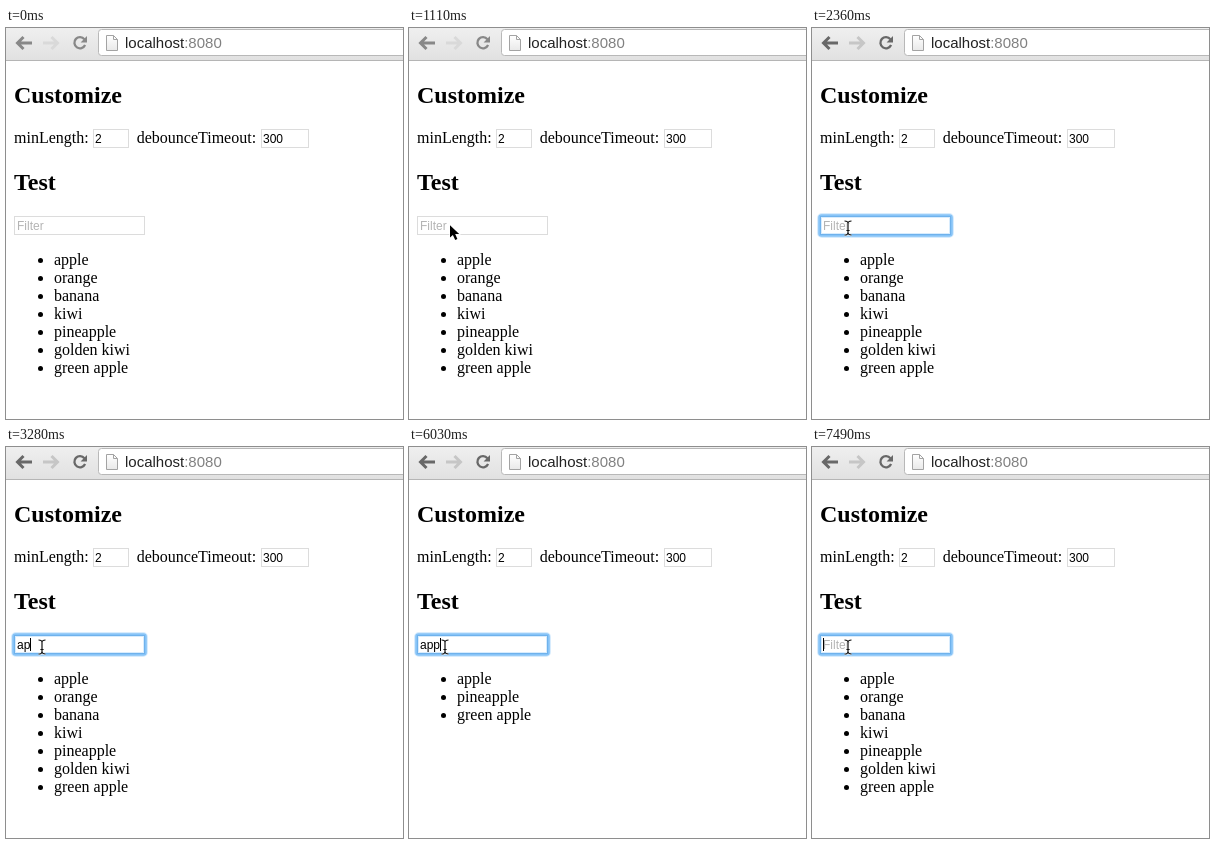
These frames come from a looping animation (397 by 391 pixels, 8 s). An HTML page:

```html
<!DOCTYPE html>
<html lang="en">
<head>
<meta charset="utf-8">
<title>Debounced filter</title>
<style>
  html, body { margin: 0; width: 100%; height: 100%; overflow: hidden; background: #fff; }
  svg { display: block; width: 397px; height: 391px; }
  text { font: 16px "Liberation Serif", "Times New Roman", serif; fill: #000; white-space: pre; }
  .title { font-size: 24px; font-weight: bold; }
  .field { font: 12px "Liberation Sans", Arial, sans-serif; }
  .hint { fill: #b4b4b4; }
  .url { font: 15px "Liberation Sans", Arial, sans-serif; fill: #222; }
  .port { fill: #808080; }
  .box { fill: #fff; stroke: #dcdcdc; }
  .icon { fill: none; stroke: #888; stroke-width: 3; }
  .forward { stroke: #d9d9d9; }
  .head { fill: #888; }
  .active .icon { stroke: #686868; }
  .active .forward { stroke: #c6c6c6; }
  .active .head { fill: #686868; }
</style>
</head>
<body>
<svg viewBox="0 0 397 391">
  <defs>
    <linearGradient id="bar" x2="0" y2="1">
      <stop offset="0" stop-color="#efefef"/><stop offset="1" stop-color="#e1e1e1"/>
    </linearGradient>
    <linearGradient id="paper" x2="0" y2="1">
      <stop offset="0" stop-color="#fff"/><stop offset="1" stop-color="#e9e9e9"/>
    </linearGradient>
  </defs>

  <g id="toolbar">
    <rect width="397" height="32" fill="url(#bar)"/>
    <rect y="32" width="397" height="1" fill="#b5b5b5"/>
    <rect x="92.5" y="1.5" width="320" height="26" rx="3" fill="#fff" stroke="#b8b8b8"/>
    <path class="icon" d="M17.5 9 11.5 15l6 6M11.5 15H26"/>
    <path class="icon forward" d="M45.5 9l6 6-6 6M51.5 15H37"/>
    <path class="icon" style="stroke-width:2.3" d="M78.4 11.2A5.6 5.6 0 1 0 79.1 17"/>
    <path class="head" d="M81 8v6.4h-6.4z"/>
    <path d="M100.5 7.5h7l4 4v11h-11z" fill="url(#paper)" stroke="#a3a3a3"/>
    <path d="M107.5 7.5v4h4" fill="none" stroke="#a3a3a3"/>
    <text class="url" x="119" y="20">localhost<tspan class="port">:8080</tspan></text>
  </g>

  <text class="title" x="8" y="75">Customize</text>
  <text x="8" y="115">minLength:</text>
  <rect class="box" x="87.5" y="101.5" width="35" height="18"/>
  <text class="field" x="89" y="115">2</text>
  <text x="130.7" y="115">debounceTimeout:</text>
  <rect class="box" x="255.5" y="101.5" width="47" height="18"/>
  <text class="field" x="257" y="115">300</text>
  <text class="title" x="8" y="162">Test</text>

  <rect class="box" x="8.5" y="188.5" width="130" height="18"/>
  <g id="ring" fill="none">
    <rect x="7.5" y="187.5" width="132" height="20" rx="2.5" stroke="#a9d4fa" stroke-width="5" opacity=".45"/>
    <rect x="7.5" y="187.5" width="132" height="20" rx="2" stroke="#86c3f7" stroke-width="2.6"/>
    <rect x="8.5" y="188.5" width="130" height="18" stroke="#6fb2ec"/>
  </g>
  <text id="entry" class="field" x="11" y="202"></text>
  <rect id="caret" y="191" width="1" height="13"/>
  <g id="list"></g>

  <path id="arrow" d="M1 1.2V13.6L3.9 11l2.3 5 2.2-1-2.2-4.9H10.2z" stroke="#fff" stroke-width="1.4" paint-order="stroke"/>
  <g id="beam" fill="none">
    <path id="bar-shape" d="M-3.5-7Q0-7 0-4.5Q0-7 3.5-7M0-5V5M-3.5 7Q0 7 0 4.5Q0 7 3.5 7M-1.6 2.5H1.6" stroke="#fff" stroke-width="2.6" opacity=".8"/>
    <path d="M-3.5-7Q0-7 0-4.5Q0-7 3.5-7M0-5V5M-3.5 7Q0 7 0 4.5Q0 7 3.5 7M-1.6 2.5H1.6" stroke="#111" stroke-width="1.2"/>
  </g>
</svg>
<script>
  const LOOP = 8000;
  const TICK = 170 / 3;
  const ENTER = 540;
  const fruits = ["apple", "orange", "banana", "kiwi", "pineapple", "golden kiwi", "green apple"];

  // Each track lists [start time, value]; values hold until the next start.
  const tracks = {
    active: [[0, false], [1290, true]],
    ring: [[0, 0], [1850, 0.55], [1940, 1]],
    typed: [[0, ""], [3130, "a"], [3280, "ap"], [5040, "app"], [6840, "ap"], [7010, "a"], [7190, ""]],
    caret: [[0, 0], [1850, 1], [2360, 0], [2870, 1], [4090, 0], [4600, 1], [5550, 0], [6030, 1], [6540, 0], [6840, 1]],
    filter: [[0, ""], [3580, "ap"], [7490, ""]],
    beam: [[0, null], [1570, [39, 203]], [1595, [37, 201]], [1620, [36, 200]]]
  };
  // Pointer way points: [time, x, y]
  const route = [[540, 330, 247], [597, 205, 218], [654, 98, 189], [710, 46, 175], [880, 42, 182], [1080, 40, 195], [1230, 39, 199]];

  const $ = id => document.getElementById(id);
  const at = (track, t) => track.findLast(([start]) => start <= t)[1];
  const show = (el, on) => el.setAttribute("visibility", on ? "visible" : "hidden");
  const move = (el, [x, y]) => el.setAttribute("transform", `translate(${x} ${y})`);

  function pointer(t) {
    const s = ENTER + Math.floor((t - ENTER) / TICK + 0.01) * TICK;
    const i = route.findIndex(([time]) => time > s);
    if (i < 0) return route.at(-1).slice(1);
    if (i === 0) return route[0].slice(1);
    const [a, b] = [route[i - 1], route[i]];
    const k = (s - a[0]) / (b[0] - a[0]);
    return [1, 2].map(n => Math.round(a[n] + (b[n] - a[n]) * k));
  }

  let listed = null;
  function showList(filter) {
    if (filter === listed) return;
    listed = filter;
    $("list").innerHTML = fruits.filter(name => name.includes(filter)).map((name, i) =>
      `<circle cx="34.5" cy="${232.5 + 18 * i}" r="2.5"/><text x="48" y="${237 + 18 * i}">${name}</text>`
    ).join("");
  }

  function draw(t) {
    const typed = at(tracks.typed, t);
    const beam = at(tracks.beam, t);

    $("toolbar").classList.toggle("active", at(tracks.active, t));
    $("ring").setAttribute("opacity", at(tracks.ring, t));
    $("entry").textContent = typed || "Filter";
    $("entry").classList.toggle("hint", !typed);
    $("caret").setAttribute("x", Math.floor(11 + typed.length * 6.674));
    show($("caret"), at(tracks.caret, t));
    showList(at(tracks.filter, t));

    show($("arrow"), t >= ENTER && !beam);
    show($("beam"), beam);
    move($("arrow"), pointer(t));
    if (beam) move($("beam"), beam);
  }

  const begin = performance.now();
  function loop() {
    draw((performance.now() - begin) % LOOP);
    requestAnimationFrame(loop);
  }
  loop();
</script>
</body>
</html>
```
